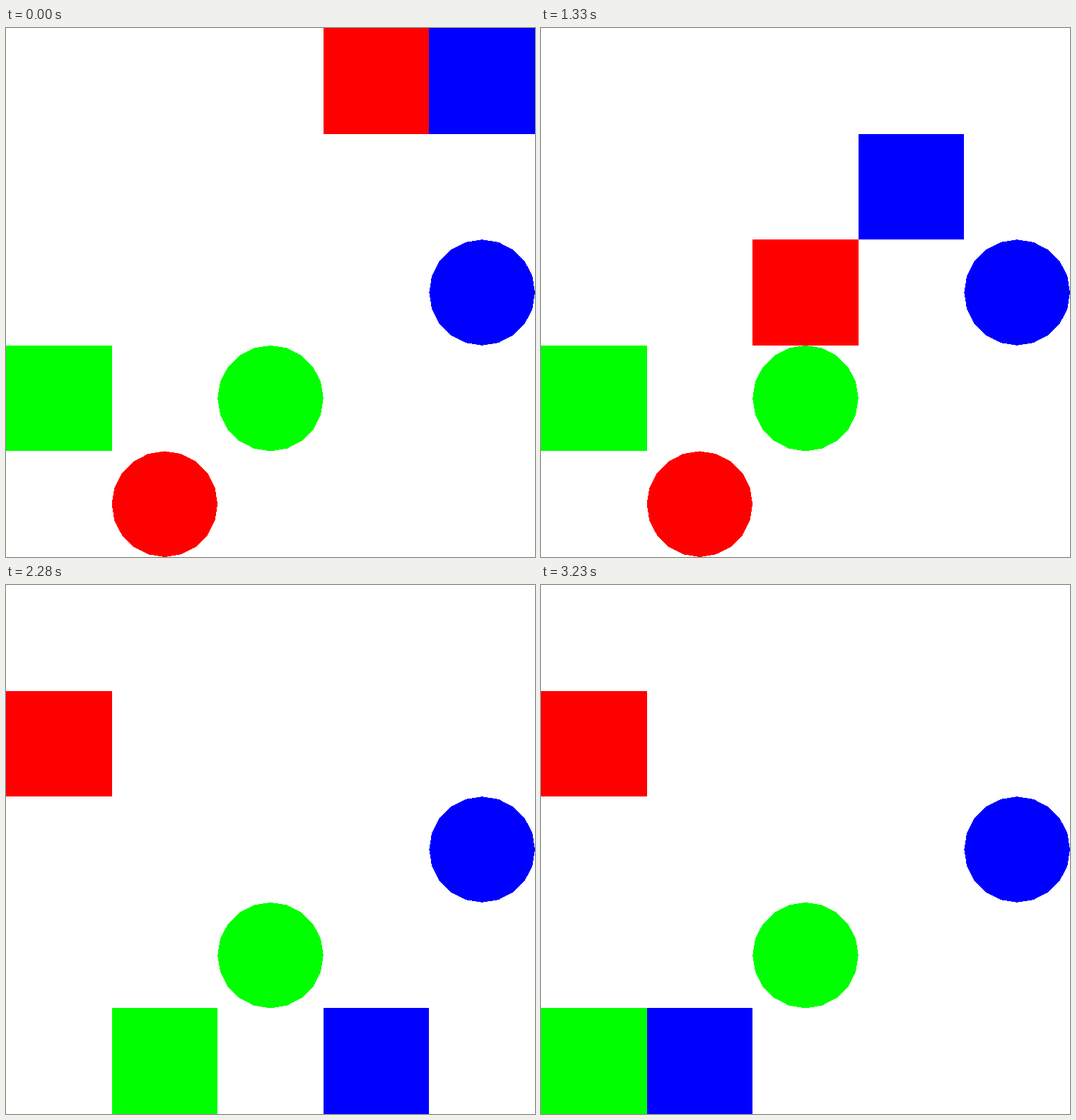
An HTML page that plays this animation: 748 px wide and 748 px high, repeating every 3.61 s.

```html
<!DOCTYPE html>
<html lang="en">
<head>
<meta charset="utf-8">
<title>Grid walkers</title>
<style>
  html, body { margin: 0; width: 100%; height: 100%; overflow: hidden; background: #fff; }
  svg { display: block; width: 100vw; height: 100vh; shape-rendering: crispEdges; }
</style>
</head>
<body>
<svg id="stage" viewBox="0 0 748 748"></svg>
<script>
const CELL = 748 / 5;
const TICK = 190;
const RED = '#f00', GREEN = '#0f0', BLUE = '#00f';
const STEPS = { U: [0, -1], D: [0, 1], L: [-1, 0], R: [1, 0], '.': [0, 0] };

const goals = [
  { color: BLUE, col: 4, row: 2 },
  { color: GREEN, col: 2, row: 3 },
  { color: RED, col: 1, row: 4 },
];

// One move per tick; a dot means waiting.
const walkers = [
  { color: RED, col: 3, row: 0, moves: '....DL.D..LLU..U.D.' },
  { color: GREEN, col: 0, row: 3, moves: '.D.....U...RDUDLUD.' },
  { color: BLUE, col: 4, row: 0, moves: '...D.L..D.DD.L...L.' },
];
const TICKS = walkers[0].moves.length;

const stage = document.getElementById('stage');

function add(tag, attributes) {
  const node = document.createElementNS(stage.namespaceURI, tag);
  for (const name in attributes) node.setAttribute(name, attributes[name]);
  return stage.appendChild(node);
}

function roundGoal({ color, col, row }) {
  const sides = 20, radius = CELL / 2;
  const points = Array.from({ length: sides }, (_, i) => {
    const angle = i / sides * 2 * Math.PI;
    return [
      (col + 0.5) * CELL + radius * Math.cos(angle),
      (row + 0.5) * CELL + radius * Math.sin(angle),
    ].map(v => v.toFixed(2)).join();
  });
  add('polygon', { points: points.join(' '), fill: color });
}

function place({ node, col, row, moves }, tick) {
  for (const move of moves.slice(0, tick + 1)) {
    col += STEPS[move][0];
    row += STEPS[move][1];
  }
  node.setAttribute('x', col * CELL);
  node.setAttribute('y', row * CELL);
}

function draw(now) {
  const tick = Math.floor(now / TICK) % TICKS;
  walkers.forEach(walker => place(walker, tick));
}

function loop(now) {
  draw(now);
  requestAnimationFrame(loop);
}

goals.forEach(roundGoal);
walkers.forEach(walker => {
  walker.node = add('rect', { width: CELL, height: CELL, fill: walker.color });
});
draw(0);
requestAnimationFrame(loop);
</script>
</body>
</html>
```
